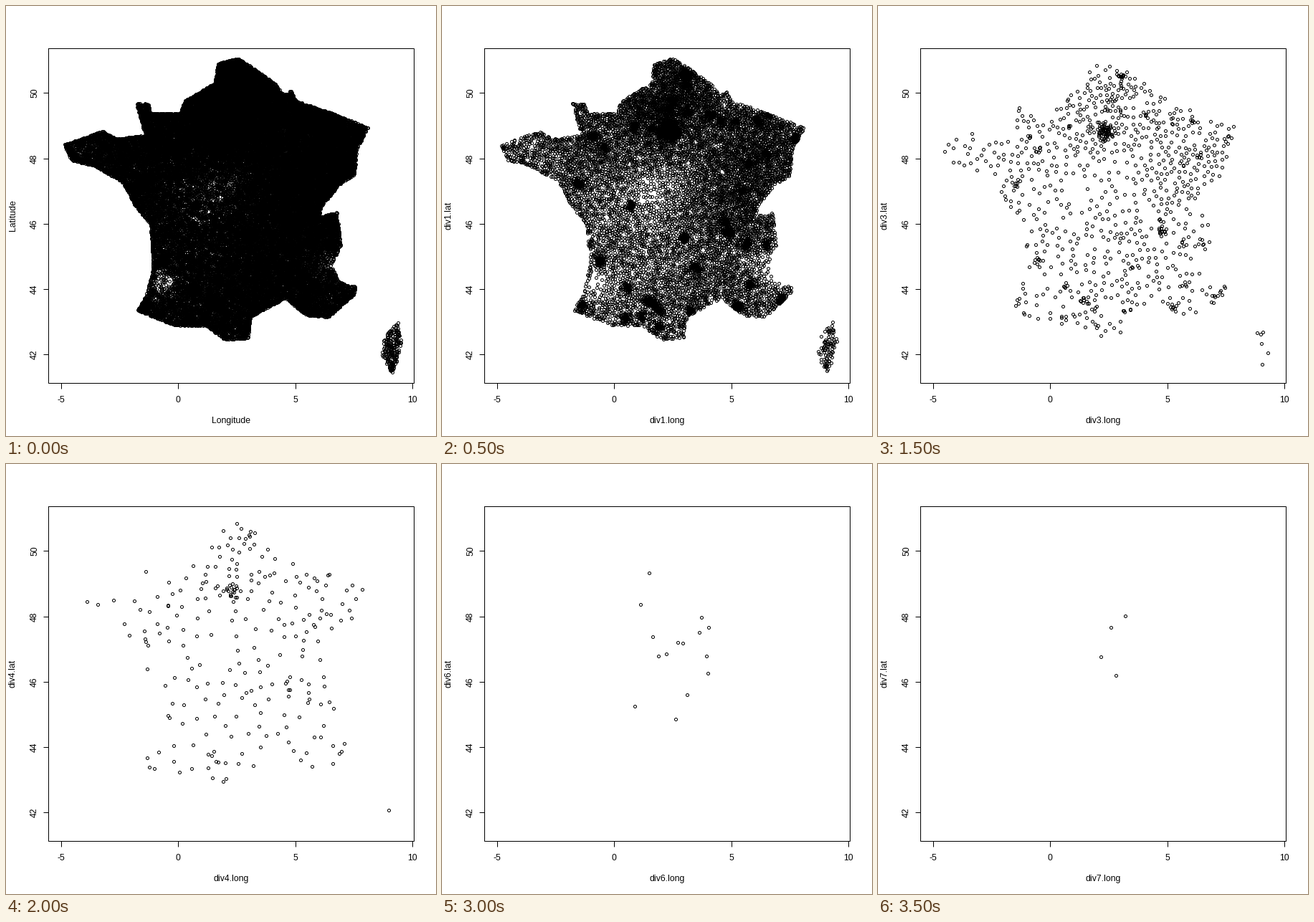
These frames come from a looping animation (600 by 600 pixels, 4 s). A matplotlib script:

```python
import numpy as np
import matplotlib.pyplot as plt
from matplotlib.animation import FuncAnimation
from matplotlib.path import Path

SIZE = 600
PX = 0.72  # points per pixel at 100 dpi
FOLD = 3.7  # each step thins the points by this factor
rng = np.random.default_rng(7)

# Corner points of the land, from the north along the sea, then the border
LAND = np.array([
    (324, 73), (296, 81), (292, 108), (250, 133), (243, 150), (203, 150),
    (199, 137), (182, 136), (195, 181), (155, 186), (135, 175), (82, 194),
    (92, 216), (125, 224), (164, 247), (180, 278), (202, 305), (206, 365),
    (196, 405), (184, 425), (235, 446), (280, 447), (306, 466), (338, 464),
    (342, 434), (390, 408), (420, 432), (450, 435), (487, 402), (488, 392),
    (466, 386), (454, 362), (468, 334), (462, 288), (439, 294), (440, 281),
    (465, 250), (487, 236), (490, 200), (506, 170), (445, 146), (405, 133),
    (398, 118), (388, 125), (375, 108), (345, 87)], float)
SHORE = LAND[:30]
ISLAND = np.array([(547, 441), (552, 470), (545, 500), (539, 514),
                   (525, 490), (528, 462)], float)

# Crowded and empty regions: x, y, radius, amount
REGIONS = [
    (318, 130, 50, 1.0), (455, 190, 42, 0.6), (425, 270, 45, 0.55),
    (215, 190, 50, 0.25), (390, 400, 50, 0.25), (275, 265, 26, -0.35),
    (315, 236, 16, -0.3), (215, 385, 17, -0.5), (450, 362, 22, -0.4)]

# Large towns: x, y, weight
TOWNS = [
    (317, 174, 70), (340, 96, 16), (399, 316, 14), (221, 356, 8),
    (287, 413, 8), (190, 248, 8), (413, 420, 8), (474, 410, 8),
    (493, 185, 6), (441, 160, 6)]
LAST = np.array([(345, 212), (325, 228), (311, 269), (332, 295)], float)


def closed(points):
    return Path(np.vstack([points, points[:1]]))


def density(p):
    d = np.full(len(p), 0.6)
    for x, y, r, amount in REGIONS:
        d += amount * np.exp(-((p - (x, y)) ** 2).sum(1) / (2 * r * r))
    return np.clip(d, 0.06, 2)


def inside(path, n, weight=None):
    """n random points in a closed path, thinned by a weight function."""
    lo, hi = path.vertices.min(0), path.vertices.max(0)
    found = np.empty((0, 2))
    while len(found) < n:
        p = rng.uniform(lo, hi, (4 * n + 50, 2))
        p = p[path.contains_points(p)]
        if weight:
            p = p[rng.random(len(p)) * 2 < weight(p)]
        found = np.vstack([found, p])
    return found[:n]


mainland, island = closed(LAND), closed(ISLAND)
small = inside(mainland, 30, density)
towns = np.vstack([TOWNS, np.c_[small, rng.uniform(2, 5, len(small))]])


def spread(n):
    """n land points that keep a distance fitting the local density."""
    pool = inside(mainland, 4 * n, density)
    gaps = 0.5 * np.sqrt(1e5 / n / density(pool))
    kept = np.full((n, 2), np.inf)
    count = 0
    for p, gap in zip(pool, gaps):
        near = ((kept[:count + 1] - p) ** 2).sum(1)
        if near.min() > gap * gap:
            kept[count] = p
            count += 1
            if count == n:
                break
    return kept[:count]


def crowd(scale):
    """Tight clusters around the towns."""
    parts = [rng.normal((x, y), 6 if w > 50 else 3.2,
                        (int(round(w * scale)), 2)) for x, y, w in towns]
    return np.vstack(parts)


def along_shore(n):
    at = np.r_[0, np.hypot(*np.diff(SHORE, axis=0).T).cumsum()]
    t = rng.uniform(0, at[-1], n)
    p = np.c_[np.interp(t, at, SHORE[:, 0]), np.interp(t, at, SHORE[:, 1])]
    return p + rng.normal(0, 2, p.shape)


def cloud(land, town_scale, shore, isle):
    extra = np.vstack([crowd(town_scale), along_shore(int(shore))])
    extra = extra[mainland.contains_points(extra)]
    return np.vstack([land, extra, inside(island, int(isle))])


def thinned(k):
    """Points after k steps, drawn a little closer to the middle each time."""
    part = FOLD ** (1 - k)
    p = cloud(spread(int(9500 * part)), 12 * part, 400 * part, 90 * part)
    middle = np.array([318, 260])
    return middle + (p - middle) * (1 - 0.0016 * 2.8 ** (k - 1))


def mean_of_four(p):
    n = len(p) // 4
    return rng.permutation(p)[:4 * n].reshape(n, 4, 2).mean(1)


def pixels(p):
    """Snap to pixel centres and drop doubles."""
    return np.unique(np.floor(p), axis=0) + 0.5


levels = [cloud(inside(mainland, 50000, density), 30, 2500, 220)]
levels += [thinned(k) for k in range(1, 6)]
levels += [mean_of_four(levels[-1]), LAST]
levels = [pixels(p) for p in levels]

fig = plt.figure(figsize=(6, 6), dpi=100, facecolor="white")
ax = fig.add_axes([0, 0, 1, 1])
ax.set_xlim(0, SIZE)
ax.set_ylim(SIZE, 0)
ax.axis("off")


def rule(xs, ys):
    ax.plot(xs, ys, color="black", lw=PX, solid_capstyle="butt",
            solid_joinstyle="miter")


def label(x, y, text, turn=0):
    return ax.text(x, y, text, family="Liberation Sans", fontsize=12.2 * PX,
                   ha="center", va="baseline", rotation=turn,
                   rotation_mode="anchor")


rule([59, 569, 569, 59, 59], [59, 59, 526, 526, 59])
for lon in range(-5, 11, 5):
    x = round(240.4 + 32.7 * lon)
    rule([x, x], [526, 534])
    label(x, 553, str(lon))
for lat in range(42, 51, 2):
    y = round(121.4 + 45.6 * (50 - lat))
    rule([52, 59], [y, y])
    label(43, y, str(lat), 90)

x_title = label(314, 582, "")
y_title = label(13, 292.5, "", 90)
dots = ax.scatter([], [], s=(4 * PX) ** 2, facecolors="none",
                  edgecolors="black", linewidths=PX)


def draw(i):
    dots.set_offsets(levels[i])
    x_title.set_text(f"div{i}.long" if i else "Longitude")
    y_title.set_text(f"div{i}.lat" if i else "Latitude")
    return dots, x_title, y_title


anim = FuncAnimation(fig, draw, frames=len(levels), interval=500,
                     repeat=True, repeat_delay=0)
plt.show()
```
